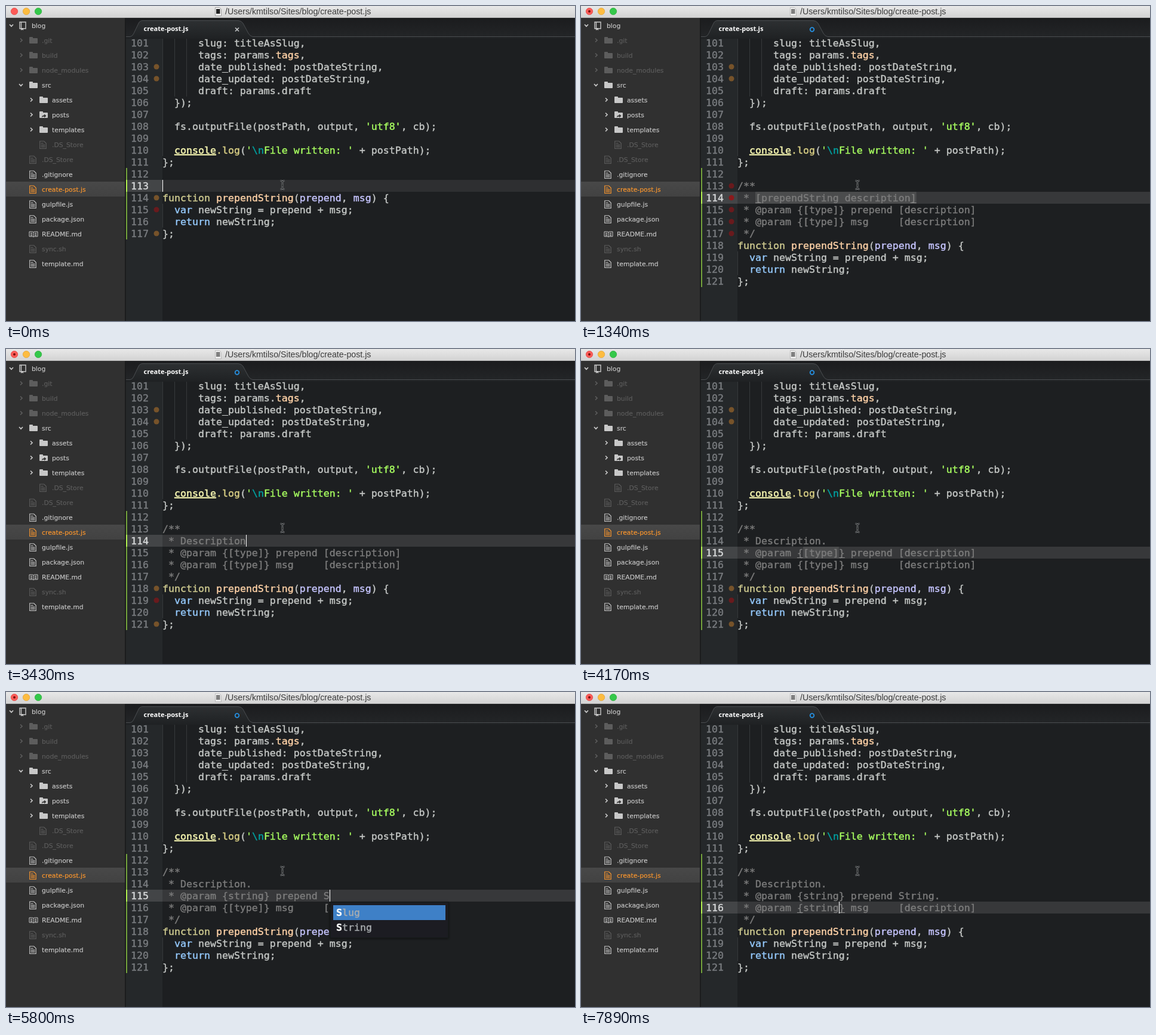
These frames come from a looping animation (953 px wide and 529 px high, 8 s). An HTML page:

```html
<!DOCTYPE html>
<html lang="en">
<head>
<meta charset="utf-8">
<title>Editor: doc comment completion</title>
<style>
  html, body { margin: 0; width: 100%; height: 100%; overflow: hidden; background: #1d1f21; }
  svg { display: block; width: 100vw; height: 100vh; }
  text { white-space: pre; stroke-width: 0; }
  text, tspan { fill: currentColor; stroke: currentColor; }
  .code { font: 16.6px "DejaVu Sans Mono", monospace; stroke-width: .4px; }
  .side { font: 10.8px "DejaVu Sans", sans-serif; stroke-width: .15px; }
  .tab { font: bold 11.1px "Noto Sans", sans-serif; }
  .title { font: 14.2px "Liberation Sans", sans-serif; }
</style>
</head>
<body>
<svg id="stage" viewBox="0 0 953 529">
  <defs>
    <linearGradient id="bar" x2="0" y2="1"><stop stop-color="#e8e8e8"/><stop offset="1" stop-color="#d2d2d2"/></linearGradient>
    <linearGradient id="tabs" x2="0" y2="1"><stop stop-color="#1b1c1e"/><stop offset="1" stop-color="#242628"/></linearGradient>
    <linearGradient id="tab" x2="0" y2="1"><stop stop-color="#2d3032"/><stop offset="1" stop-color="#1f2123"/></linearGradient>
    <linearGradient id="row" x2="0" y2="1"><stop stop-color="#484848"/><stop offset="1" stop-color="#424242"/></linearGradient>
    <clipPath id="pane"><path d="M201 55H953V529H201z"/></clipPath>
    <filter id="shadow"><feDropShadow dx="0" dy="1" stdDeviation="2" flood-opacity=".5"/></filter>
  </defs>
  <g id="editor" clip-path="url(#pane)"></g>
  <g id="frame"></g>
</svg>
<script>
const LOOP = 8000, LEFT = 262, COL = 9.99, ROW = 20;
const lineTop = line => 52 + (line - 101) * ROW;
const colX = col => LEFT + col * COL;

const rect = (x, y, w, h, fill, more = '') => `<rect x="${x}" y="${y}" width="${w}" height="${h}" fill="${fill}" ${more}/>`;
const circle = (x, y, r, fill, more = '') => `<circle cx="${x}" cy="${y}" r="${r}" fill="${fill}" ${more}/>`;
const path = (d, stroke, width = 1, fill = 'none') => `<path d="${d}" stroke="${stroke}" stroke-width="${width}" fill="${fill}"/>`;
const text = (cls, x, y, color, body) => `<text class="${cls}" x="${x}" y="${y}" color="${color}">${body}</text>`;

// ---- Code: segments split by "|", each optionally prefixed with "colour~"
const COLORS = { p: '#ffd2a7', c: '#ffffb6', l: '#dad085', s: '#a8ff60', e: '#00a0a0',
                 f: '#cfcb90', a: '#c6c5fe', k: '#96cbfe' };
const HEAD = [
  '      slug: titleAsSlug,',
  '      tags: params.|p~tags|,',
  '      date_published: postDateString,',
  '      date_updated: postDateString,',
  '      draft: params.draft',
  '  });',
  '',
  "  fs.outputFile(postPath, output, |s~'utf8'|, cb);",
  '',
  "  |c~console|l~.log|(|s~'|e~\\n|s~File written: '| + postPath);",
  '};',
  ''
];
const TAIL = [
  'f~function| |p~prependString|(|a~prepend|, |a~msg|) {',
  '  |k~var| newString = prepend + msg;',
  '  |k~return| newString;',
  '};'
];
const COMMENT = '#7c7c7c';

function tokens(line) {
  return line.split('|').map(seg => {
    const [, key, body] = seg.match(/^(?:(\w)~)?(.*)$/);
    const underline = key === 'c' ? ' text-decoration="underline"' : '';
    return key ? `<tspan color="${COLORS[key]}"${underline}>${body}</tspan>` : body;
  }).join('');
}

// ---- Timeline: each entry changes part of the state. Negative dots are errors.
const type = (t, field, value, more) => [t, { field, [field]: value, select: false, words: [], ...more }];
const select = (t, field, more) => [t, { field, select: true, words: [], ...more }];
const typeAll = (field, times, word, more = {}) =>
  times.map((t, i) => type(t, field, word.slice(0, i + 1), more[i]));

const LINT = { dots: [103, 104, 118, -119, 121] }, CLEAR = { dots: [] };
const S_WORDS = ['slug', 'string', 'split', 'slice', 'sync', 'src', 'sort', 'substr', 'shift', 'setTimeout'];
const MANY = { words: S_WORDS, wide: 450 };
const DESCRIPTION = { words: ['Description'], wide: 198 };
const STRING = { words: ['String'], wide: 198 };

const timeline = [
  [0, { open: '', desc: '[prependString description]', type1: '[type]', note1: '[description]', type2: '[type]',
        field: 'open', select: false, caret: true, words: [], wide: 198, doc: false, dirty: false,
        dots: [103, 104, 114, -115, 117] }],
  [150, { caret: false }],
  type(450, 'open', '/', { caret: true, dirty: true }),
  type(600, 'open', '/*'),
  type(750, 'open', '/**'),
  [890, CLEAR],
  [1040, { dots: [103, 104, -113, -114, -115, -116, -117] }],
  select(1190, 'desc', { doc: true }),
  type(1940, 'desc', 'D'),
  type(2090, 'desc', 'De', { ...DESCRIPTION, ...CLEAR }),
  type(2240, 'desc', 'Des', { ...DESCRIPTION, ...LINT }),
  type(2390, 'desc', 'Desc', DESCRIPTION),
  type(2690, 'desc', 'Descr', DESCRIPTION),
  type(2990, 'desc', 'Descri', DESCRIPTION),
  type(3140, 'desc', 'Descript', DESCRIPTION),
  type(3290, 'desc', 'Descriptio', DESCRIPTION),
  type(3430, 'desc', 'Description'),
  type(3720, 'desc', 'Description.', CLEAR),
  [3870, LINT],
  select(4170, 'type1'),
  ...typeAll('type1', [4460, 4610, 4760, 4910, 5060, 5200], 'string', [{ ...MANY, ...CLEAR }, LINT]),
  select(5350, 'note1'),
  type(5650, 'note1', 'S', CLEAR),
  [5800, { words: ['Slug', 'String'], wide: 198 }],
  type(5950, 'note1', 'Str', { ...STRING, ...LINT }),
  type(6100, 'note1', 'Stri', STRING),
  type(6250, 'note1', 'String'),
  type(6400, 'note1', 'String.'),
  select(6690, 'type2', CLEAR),
  ...typeAll('type2', [6840, 6990, 7140, 7290, 7440, 7590], 'string', [{ ...MANY, ...LINT }]),
  [7890, CLEAR]
];
const states = [];
timeline.forEach(([, change], i) => states.push({ ...states[i - 1], ...change }));

// ---- Editor pane
function popup(s, x, line) {
  if (!s.words.length) return '';
  const height = s.words.length * 25 + 10, below = lineTop(line) + ROW + 1;
  const y = below + height > 529 ? lineTop(line) - height - 1 : below;
  const typed = s[s.field].length;
  return rect(x, y, s.wide, height, '#1c1e20', 'stroke="#17181a" filter="url(#shadow)"') +
    s.words.map((word, i) => {
      const itemY = y + 5 + i * 25;
      return (i ? '' : rect(x + 5, itemY, s.wide - 10, 25, '#3e80c7')) +
        text('code', x + 10, itemY + 18, '#a9adb0',
          `<tspan color="#fff" font-weight="bold">${word.slice(0, typed)}</tspan>${word.slice(typed)}`);
    }).join('');
}

function drawEditor(s) {
  const doc = s.doc ? ['/**', ` * ${s.desc}`, ` * @param {${s.type1}} prepend ${s.note1}`,
                       ` * @param {${s.type2}} msg     [description]`, ' */'] : [s.open];
  const lines = [...HEAD, ...doc, ...TAIL];
  const last = 100 + lines.length;
  const [active, col] = { open: [113, 0], desc: [114, 3], type1: [115, 11],
                          note1: [115, 21 + s.type1.length], type2: [116, 11] }[s.field];
  const end = col + s[s.field].length, y = lineTop(active);
  const caretX = Math.round(colX(end));
  const unclosed = !s.doc && s.open.startsWith('/*');

  let out = rect(201, 55, 752, 474, '#1d1f21') + rect(201, 55, 61, 474, '#25282a');
  out += rect(201, y, 61, ROW, '#434547') + rect(LEFT, y, 691, ROW, s.doc ? '#37383a' : '#2e2f31');
  out += rect(201, lineTop(112), 2, lineTop(last) + ROW - lineTop(112), '#74a33c') + rect(201, y, 2, ROW, '#b2f34f');

  const guide = (c, from, to) => rect(colX(c).toFixed(1), lineTop(from), 1, lineTop(to) + ROW - lineTop(from), '#36393b');
  out += guide(0, 101, 110) + guide(2, 101, 105) + guide(4, 101, 105) + guide(0, last - 2, last - 1);

  if (s.select) out += rect(colX(col), y, (end - col) * COL, ROW, '#4b4c4d');

  lines.forEach((line, i) => {
    const n = 101 + i, base = lineTop(n) + 16;
    const inDoc = n >= 113 && (unclosed || (s.doc && n <= 117));
    out += text('code', 209, base, n === active ? '#d8dadb' : '#7a7d80', n);
    out += text('code', LEFT, base, inDoc ? COMMENT : '#c5c8c6', inDoc ? line.replace(/\w~|\|/g, '') : tokens(line));
  });

  for (const dot of s.dots) {
    const n = Math.abs(dot);
    out += circle(252, lineTop(n) + 10, 4.5, dot > 0 ? '#77532a' : n === active ? '#8c1a1c' : '#691a1d');
  }

  // Matching bracket pair next to the caret
  const pair = s.field.startsWith('type') ? [col - 1, end] : s.select ? [col, end - 1] : [];
  for (const c of pair) out += rect(colX(c), y + ROW - 2, COL, 1, '#8c8c8c');

  if (s.caret && !s.select) out += rect(caretX, y, 1, ROW, '#fff');
  out += popup(s, caretX + 1, active);

  const beam = 'M459.5 293.5q3 0 3.5 1.5q.5 -1.5 3.5 -1.5M463 295V306M461 301H465M459.5 307.5q3 0 3.5 -1.5q.5 1.5 3.5 1.5';
  return out + path(beam, '#85888a', 2.6) + path(beam, '#151617', 1);
}

// ---- Sidebar rows: [depth, icon, name, ignored]
const TREE = [
  [0, 'repo', 'blog'], [1, 'folder', '.git', 1], [1, 'folder', 'build', 1], [1, 'folder', 'node_modules', 1],
  [1, 'open', 'src'], [2, 'folder', 'assets'], [2, 'link', 'posts'], [2, 'folder', 'templates'],
  [2, 'file', '.DS_Store', 1], [1, 'file', '.DS_Store', 1], [1, 'file', '.gitignore'],
  [1, 'file', 'create-post.js'], [1, 'file', 'gulpfile.js'], [1, 'file', 'package.json'],
  [1, 'book', 'README.md'], [1, 'file', 'sync.sh', 1], [1, 'file', 'template.md']
];

function icon(kind, x, y, color) {
  const at = (dx, dy) => `M${x + dx} ${y + dy}`;
  if (kind === 'repo')
    return path(`${at(1, -6)}h10v11h-10zM${x + 3.5} ${y - 6}v11`, color, 1.4) + path(`${at(3, 4)}h4v4l-2 -1.5l-2 1.5z`, 'none', 0, color);
  if (kind === 'book')
    return path(`${at(0, -4)}h5.5l1.5 1l1.5 -1h5.5v8h-5.5l-1.5 1l-1.5 -1h-5.5zM${x + 7} ${y - 3}v8${at(2, -1.5)}h3m-3 2h3m-3 2h3m4 -4h3m-3 2h3m-3 2h3`, color);
  if (kind === 'file')
    return path(`${at(.7, -6)}h7l3.5 3.5v9h-10.5zM${x + 2.5} ${y - 2.5}h4m-4 2.5h7m-7 2h7m-7 2h7`, color, 1.1);
  return path(`${at(0, -5)}q0 -1 1 -1h4q1 0 1 1v1h7q1 0 1 1v7q0 1 -1 1h-12q-1 0 -1 -1z`, 'none', 0, color) +
    (kind === 'link' ? path(`${at(4, 4)}q0 -3.5 4 -3.5v-2l3.5 3l-3.5 3v-2q-3 0 -4 1.5z`, 'none', 0, '#303030') : '');
}

function drawSidebar() {
  let out = rect(0, 20, 200, 509, '#303030') + rect(199, 20, 2, 509, '#1b1c1d') + rect(0, 295, 199, 25, 'url(#row)');
  TREE.forEach(([depth, kind, name, ignored], i) => {
    const y = 33 + i * 25, x = depth ? 22 + depth * 17 : 22;
    const color = name === 'create-post.js' ? '#ff982d' : ignored ? '#5d5d5d' : '#c8c8c8';
    const arrowX = depth ? x - 14 : 9;
    if (kind === 'repo' || kind === 'open') out += path(`M${arrowX - 3} ${y - 2}l3 3.2l3 -3.2`, color, 1.7);
    else if (kind !== 'file' && kind !== 'book') out += path(`M${arrowX - 1} ${y - 3.5}l3 3l-3 3`, color, 1.7);
    out += icon(kind, x, y, color) + text('side', depth ? x + 21 : 43, y + 4, color, name);
  });
  return out;
}

function drawTop(dirty) {
  const tab = 'M201 51.5H208Q212 51 214 46L222 29Q224 24.5 229 24.5H389Q394 24.5 397 29L406 46Q409 51 413 51.5H953';
  let out = rect(201, 20, 752, 35, 'url(#tabs)') + rect(201, 51, 752, 4, '#1f2123');
  out += path(tab + 'V55H201z', 'none', 0, 'url(#tab)') + path(tab, '#4a4d50');
  out += text('tab', 230.5, 42, '#fff', 'create-post.js');
  out += dirty ? circle(387, 39.5, 3.3, 'none', 'stroke="#258fe0" stroke-width="1.8"')
               : path('M384 36.5l6 6m0 -6l-6 6', '#c4c6c8', 1.7);
  out += rect(0, 0, 953, 20, 'url(#bar)') + rect(0, 19, 953, 1, '#b9b9b9');
  [['#fc5b57', '#e0443f'], ['#fdbc40', '#dfa033'], ['#34c84a', '#27aa35']].forEach(([fill, edge], i) => {
    out += circle(14 + i * 20, 9, 5.7, fill, `stroke="${edge}" stroke-width=".7"`);
  });
  if (dirty) out += circle(14, 9, 2, '#760f0d');
  out += `<g opacity="${dirty ? .5 : 1}">` + path('M350.5 2.5h7l3 3v11h-10z', '#999', 1, '#fff') + rect(352, 5, 6.5, 8, '#222') + '</g>';
  return out + text('title', 367, 14, '#3c3c3c', '/Users/kmtilso/Sites/blog/create-post.js');
}

// ---- Playback
const editor = document.getElementById('editor'), frame = document.getElementById('frame');
const sidebar = drawSidebar(), start = performance.now();
let shown = -1;

function tick() {
  const t = (performance.now() - start) % LOOP;
  const index = timeline.findLastIndex(([at]) => at <= t);
  if (index !== shown) {
    shown = index;
    editor.innerHTML = drawEditor(states[index]);
    frame.innerHTML = sidebar + drawTop(states[index].dirty);
  }
  requestAnimationFrame(tick);
}
tick();
</script>
</body>
</html>
```
